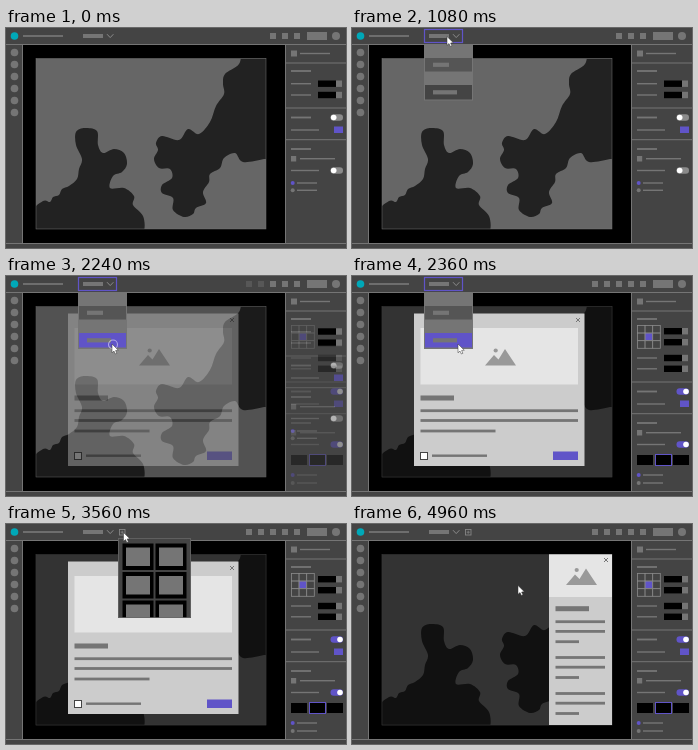
An HTML page that plays this animation: 340x220 px, repeating every 5.8 s.

```html
<!DOCTYPE html>
<html lang="en">
<head>
<meta charset="utf-8">
<title>Popup editor</title>
<style>
html, body { margin: 0; width: 100%; height: 100%; overflow: hidden; background: #000; }
svg { display: block; width: 100vw; height: 100vh; }
</style>
</head>
<body>
<svg id="stage" viewBox="0 0 340 220"></svg>
<script>
const LOOP = 5800, STEP = 40;
const BAR = '#444', GRAY = '#757575', PURPLE = '#6054c8', PAPER = '#ccc', PALE = '#e5e5e5';

const rect = (x, y, w, h, fill, extra = '') =>
  `<rect x="${x}" y="${y}" width="${w}" height="${h}" fill="${fill}" ${extra}/>`;
const dot = (x, y, r, fill = GRAY) => `<circle cx="${x}" cy="${y}" r="${r}" fill="${fill}"/>`;
const line = (x, y, w, h = 1.4, fill = GRAY) => rect(x, y - h / 2, w, h, fill);
const path = (d, extra) => `<path d="${d}" ${extra}/>`;
const outline = (x, y, w, h, color, width = 1, extra = '') =>
  rect(x, y, w, h, 'none', `stroke="${color}" stroke-width="${width}" ${extra}`);
const group = (id, body, extra = '') => `<g id="${id}" ${extra}>${body}</g>`;

// Closed smooth curve through a few points.
function blob(points) {
  const p = points.split(' ').map(s => s.split(',').map(Number));
  const n = p.length, at = i => p[(i + n) % n];
  let d = 'M' + p[0];
  for (let i = 0; i < n; i++) {
    const [a, b, c, e] = [at(i - 1), at(i), at(i + 1), at(i + 2)];
    const c1 = b.map((v, k) => v + (c[k] - a[k]) / 6);
    const c2 = c.map((v, k) => v - (e[k] - b[k]) / 6);
    d += `C${c1} ${c2} ${c}`;
  }
  return path(d + 'Z', 'fill="#222"');
}

const canvas = rect(30, 30.5, 230, 170.5, '#666') +
  `<g clip-path="url(#canvasClip)">` +
  blob('20,215 24,186 37,173 44,174 47,169 53,167 56,161 63,158 71,151 73,141 76,131 ' +
    '70,117 70,104 79,100 91,103 92,117 97,125 108,121 118,125 121,136 116,144 107,148 ' +
    '104,160 118,160 128,168 127,177 137,188 138,203 130,215') +
  blob('275,15 240,18 233,36 219,46 217,56 218,66 210,78 204,94 193,106 182,101 173,112 ' +
    '156,108 150,115 152,122 148,131 153,140 164,141 166,150 156,157 156,165 167,170 ' +
    '167,182 178,189 187,186 190,180 200,175 197,164 203,154 204,146 214,140 218,130 ' +
    '229,125 237,134 258,131 275,127') +
  '</g>' + outline(30, 30.5, 230, 170.5, GRAY, 0.5);

const chrome =
  rect(0, 0, 340, 16, BAR) + rect(0, 16, 16, 204, BAR) + rect(280, 16, 60, 204, BAR) +
  rect(0, 215, 340, 5, BAR) +
  line(0, 16.5, 340, 1) + line(0, 215.5, 340, 1) +
  rect(16, 17, 1, 198, GRAY) + rect(279, 17, 1, 198, GRAY) +
  dot(8.5, 8, 3.8, '#00a8b8') + line(17, 8, 40, 1.7) +
  [264, 276, 288].map(x => rect(x, 5, 6, 6, GRAY)).join('') +
  rect(301, 4, 20, 8, GRAY) + dot(330, 8, 4) +
  [0, 1, 2, 3, 4, 5].map(i => dot(8.5, 24.5 + 12 * i, 3.8)).join('') +
  rect(285, 22.5, 6, 6, GRAY) + line(294, 25.5, 30) + line(280, 35, 60, 1);

const field = y => rect(312, y - 3.2, 18, 6.4, '#000') + rect(330, y - 3.2, 6, 6.4, GRAY);
const row = y => line(285, y, 20) + field(y);
const toggle = (y, on) =>
  rect(324.5, y - 3.2, 12.5, 6.4, on ? PURPLE : '#8b8b8b', 'rx="3.2"') +
  dot(on ? 334 : 327.7, y, 2.8, '#fff');
const option = (y, color) => dot(286.7, y, 2, color) + line(291, y, 20);

// Settings below the size fields; they sit lower once a popup exists.
const settings = (y, on) =>
  line(280, y, 60, 1) + line(285, y + 9.5, 20, 1.8) + toggle(y + 9.5, on) +
  line(285, y + 22, 28) + rect(328, y + 18.5, 9, 6.5, PURPLE) +
  line(280, y + 31.7, 60, 1) + line(285, y + 41, 20, 1.8) +
  rect(285, y + 48, 5.2, 5.5, GRAY) + line(294, y + 50.7, 35) +
  line(285, y + 62.5, 28) + toggle(y + 62.5, on);

const emptyPanel = line(285, 43, 20, 1.8) + row(55.7) + row(67) + settings(80, false) +
  option(155, PURPLE) + option(162.3, GRAY);

const cells = [0, 1, 2].flatMap(r => [0, 1, 2].map(c =>
  rect(285.5 + 7.6 * c, 49.5 + 7.6 * r, 7.6, 7.6, r === 1 && c === 1 ? PURPLE : BAR,
    'stroke="#8a8a8a" stroke-width=".8"'))).join('');
const fullPanel = rect(280, 36, 60, 179, BAR) + line(285, 43, 20, 1.8) + cells +
  field(55.2) + field(66.2) + row(82) + row(92.8) + settings(106, true) +
  [285, 303, 321].map(x => rect(x, 179, 16, 10, '#000')).join('') +
  outline(303.5, 178.5, 16, 11, PURPLE) + option(199, PURPLE) + option(207, GRAY) +
  rect(240, 5, 6, 6, GRAY) + rect(252, 5, 6, 6, GRAY);

const picture = (dx, dy) => `<g transform="translate(${dx} ${dy})" fill="#999">` +
  path('M133 89.5L142 79L146.5 83.5L153 73L164 89.5Z', '') + dot(143.7, 74.5, 2.1, '#999') + '</g>';
const closeMark = (x, y) =>
  path(`M${x - 2} ${y - 2}l4 4m0-4l-4 4`, `stroke="${GRAY}" stroke-width="1"`);

const popup = rect(62, 37.5, 170.5, 152.5, PAPER) + rect(68.5, 52, 157.5, 56.5, PALE) +
  picture(0, 0) + closeMark(226, 44) + line(68.5, 122, 33.5, 5) +
  line(68.5, 134.7, 157.5, 2.8) + line(68.5, 144.5, 157.5, 2.8) + line(68.5, 155, 75, 2.8) +
  rect(68.5, 176.5, 7, 7, '#fff', 'stroke="#444"') + line(80, 179.7, 55, 2.4) +
  rect(201, 175.5, 25, 8.5, PURPLE);

const sidebar = rect(197, 30.5, 63, 170.5, PAPER) + rect(197, 30.5, 63, 42.5, PALE) +
  picture(81, -28.5) + closeMark(254, 36) + line(203.5, 84.7, 33.5, 5) +
  [97.7, 133.5, 169.5].map(y =>
    line(203.5, y, 49.5, 2.8) + line(203.5, y + 9.7, 49.5, 2.8) + line(203.5, y + 20, 23.5, 2.8)).join('');

const select = rect(77, 6, 20, 4, GRAY) +
  path('M101 6.2l3.2 3.4l3.2-3.4', 'fill="none" stroke="#8a8a8a" stroke-width="1"');
const list = rect(72, 16, 49, 57, GRAY) +
  rect(73, 30, 47, 13.5, '#555', 'id="first"') + rect(81, 34.7, 16, 4.2, GRAY) +
  rect(73, 57, 47, 14.5, BAR, 'id="second"') + rect(81, 62.2, 24, 4.2, GRAY);

const addIcon = outline(113.5, 5.5, 5.5, 5.5, '#858585', 0.9) +
  path('M114.7 8.2h3.1M116.2 6.7v3.1', 'stroke="#858585" stroke-width=".8"');

const tiles = [0, 1, 2].flatMap(r => [0, 1].map(c => {
  const x = 116.5 + 33 * c, y = 19.5 + 28.5 * r;
  return rect(x, y, 31, 26.5, '#000') + rect(x + 3.5, y + 4, 24, 18.5, GRAY);
})).join('');
const gallery = rect(112, 14, 73, 80, BAR) + tiles +
  outline(0, 0, 30.5, 26, PURPLE, 1.1, 'id="tileHover"') + outline(112.5, 14.5, 72, 79, '#666', 0.8);

const clip = (id, x, y, w, h) =>
  `<clipPath id="${id}"><rect id="${id}Box" x="${x}" y="${y}" width="${w}" height="${h}"/></clipPath>`;

document.getElementById('stage').innerHTML =
  '<defs>' + clip('canvasClip', 30, 30.5, 230, 170.5) + clip('listClip', 72, 15.5, 49, 57.5) +
  clip('galleryClip', 112, 14, 73, 80) + '</defs>' +
  rect(0, 0, 340, 220, '#000') + canvas + chrome + emptyPanel +
  group('full', fullPanel) + group('shade', rect(29.5, 30, 231, 171.5, '#000')) +
  group('popup', popup) + group('sidebar', sidebar) + group('add', addIcon) + select +
  group('focus', outline(72.5, 1.5, 38, 13, PURPLE, 1.2)) +
  group('list', list, 'clip-path="url(#listClip)"') +
  group('gallery', gallery, 'clip-path="url(#galleryClip)"') +
  group('cursor',
    group('ring', '<circle id="ringShape" cx="1" cy=".5" fill="none" stroke="#fff" stroke-width="1.1"/>') +
    path('M0 0V8.8L2 7.1L3.4 10L4.9 9.3L3.6 6.5L6.3 6.2Z',
      'fill="#fff" stroke="#333" stroke-width=".5"'));

const el = id => document.getElementById(id);
const fade = (id, v) => el(id).setAttribute('opacity', v);
const ramp = (t, a, b) => Math.min(1, Math.max(0, (t - a) / (b - a)));
const sine = p => (1 - Math.cos(Math.PI * p)) / 2;
const easeOut = p => 1 - (1 - p) ** 2;

const moves = [
  { from: 40, to: 440, x: 95, y: 8.5 },
  { from: 1560, to: 1960, x: 106, y: 68 },
  { from: 2760, to: 3200, x: 117.5, y: 8.5 },
  { from: 3960, to: 4360, x: 166, y: 61.5 }
];
const clicks = [640, 2160, 3320];

function cursorAt(t) {
  let x = 133, y = 85;
  for (const m of moves) {
    const p = sine(ramp(t, m.from, m.to));
    x += (m.x - x) * p;
    y += (m.y - y) * p;
  }
  return [x, y];
}

function draw(t) {
  const [x, y] = cursorAt(t);
  el('cursor').setAttribute('transform', `translate(${x} ${y})`);
  fade('cursor', ramp(t, 40, 240));
  const ring = Math.max(...clicks.map(c => Math.min(ramp(t, c - 160, c), 1 - ramp(t, c, c + 160))));
  fade('ring', ring);
  el('ringShape').setAttribute('r', 3 + 3 * ring);

  const closing = ramp(t, 2720, 2920);
  const open = easeOut(ramp(t, 640, 1120)) * (1 - closing);
  el('listClipBox').setAttribute('height', 57.5 * open);
  fade('focus', ramp(t, 640, 760) * (1 - closing));
  el('first').setAttribute('fill', t > 1560 && y >= 29 && y < 44 ? PURPLE : '#555');
  el('second').setAttribute('fill', t > 1560 && y >= 56 ? PURPLE : BAR);

  const created = ramp(t, 2160, 2360);
  const swap = ramp(t, 4760, 4960);
  fade('full', created);
  fade('shade', created / 2);
  fade('popup', created * (1 - swap));
  fade('sidebar', swap);
  fade('add', ramp(t, 2880, 3200));

  const shown = ramp(t, 3320, 3560) * (1 - ramp(t, 4600, 4800));
  el('galleryClipBox').setAttribute('height', 80 * shown);
  const col = x < 148.5 ? 0 : 1, line = y < 47.5 ? 0 : 1;
  el('tileHover').setAttribute('x', 116.8 + 33 * col);
  el('tileHover').setAttribute('y', 19.8 + 28.5 * line);
  fade('tileHover', y > 19.5 ? 1 : 0);
}

const start = performance.now();
function tick() {
  const t = (performance.now() - start) % LOOP;
  draw(Math.floor(t / STEP) * STEP);
  requestAnimationFrame(tick);
}
tick();
</script>
</body>
</html>
```
